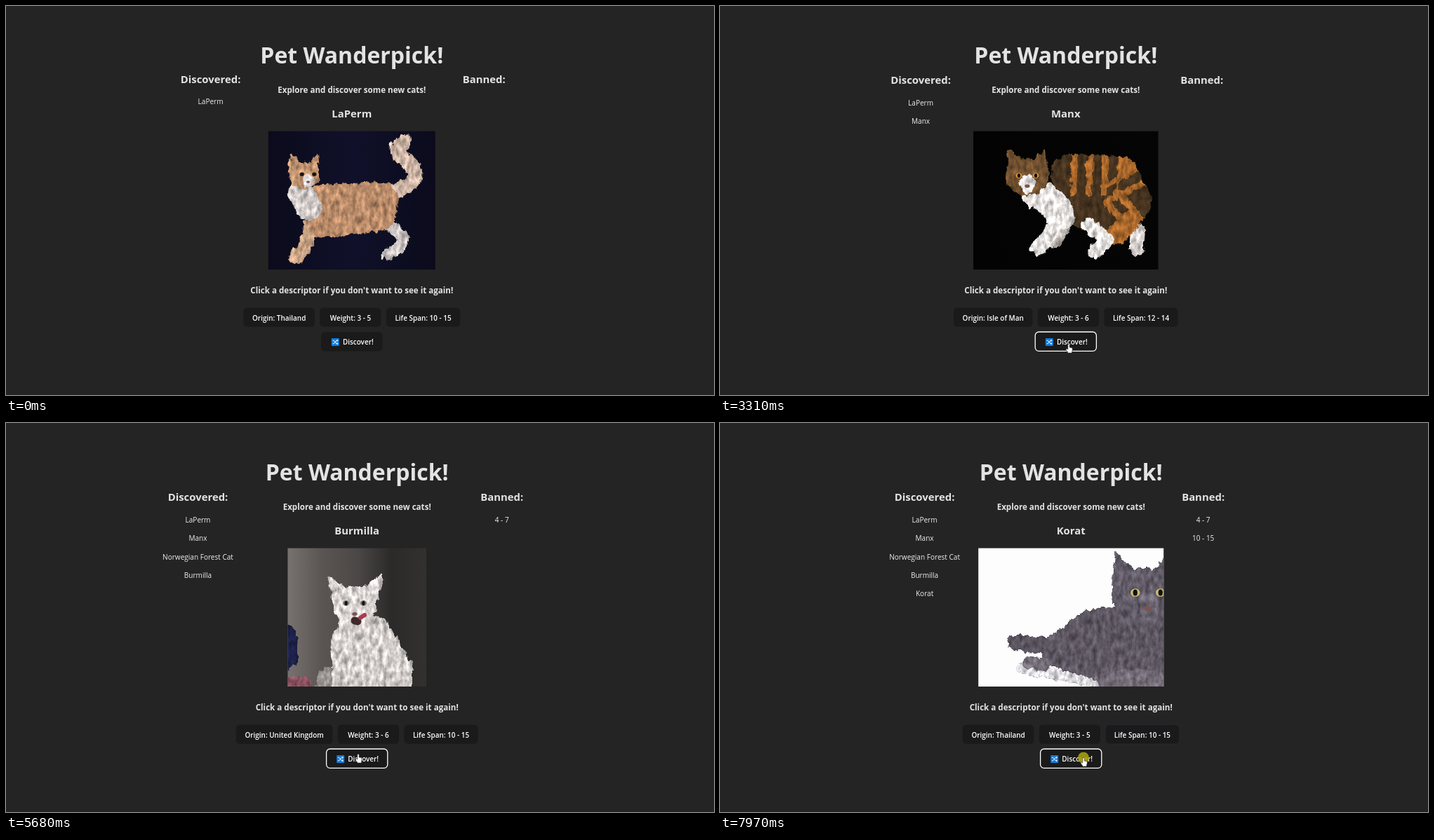
Animation of 1009 by 555 pixels, one loop 8000 ms. Source, as an HTML page:

```html
<!DOCTYPE html>
<html lang="en">
<head>
<meta charset="utf-8">
<title>Pet Wanderpick</title>
<style>
  html, body { margin: 0; width: 100%; height: 100%; overflow: hidden; background: #242424; }
  svg { display: block; width: 100%; height: 100%; }
  text { font: 400 10.05px "Open Sans", "Noto Sans", sans-serif; fill: #efefef; text-anchor: middle; }
  .h1, .h2, .h3 { font-weight: 700; fill: #e3e3e3; }
  .h1 { font-size: 32px; }
  .h2 { font-size: 14.9px; }
  .h3 { font-size: 11.62px; }
  .btn { font-weight: 600; font-size: 9.95px; fill: #fff; }
</style>
</head>
<body>
<svg viewBox="0 0 1009 555" preserveAspectRatio="none">
  <defs>
    <filter id="fur" filterUnits="userSpaceOnUse" x="350" y="165" width="300" height="225" color-interpolation-filters="sRGB">
      <feTurbulence type="fractalNoise" baseFrequency="0.16 0.09" numOctaves="3" seed="4" result="noise"/>
      <feDisplacementMap in="SourceGraphic" in2="noise" scale="9" xChannelSelector="R" yChannelSelector="G" result="ragged"/>
      <feColorMatrix in="noise" values="1 0 0 0 0  1 0 0 0 0  1 0 0 0 0  0 0 0 0 1" result="shade"/>
      <feComposite in="ragged" in2="shade" operator="arithmetic" k1="0.9" k2="0.55"/>
      <feGaussianBlur stdDeviation="0.6"/>
    </filter>
  </defs>
  <g id="photos"></g>
  <g id="page"></g>
  <g id="pointer"></g>
</svg>
<script>
const LOOP = 8000, STEP = 70, CENTER = 480;
const $ = id => document.getElementById(id);

// Parts are [thickness, colour, path, dash]; paths that close are filled too.
const cats = [
  { at: 0, name: 'LaPerm', origin: 'Thailand', weight: '3 - 5', life: '10 - 15',
    width: 238, back: ['#0b0b1c', '#10102a', '#0b0b1c'],
    parts: [
      [22, '#cbb3a4', 'M553 264Q600 250 572 222Q548 206 567 195'],
      [17, '#cbc4c2', 'M545 312Q574 330 562 343L544 354'],
      [20, '#c7a284', 'M434 310Q434 338 413 359'],
      [46, '#b98b69', 'M450 278L535 274L532 298L452 307Z'],
      [36, '#cfc9c7', 'M420 268L432 288']],
    head: [425, 240, 22], look: .25, coat: '#c19470', muzzle: '#dcd7d5', eye: '#2c221c' },
  { at: 2830, name: 'Manx', origin: 'Isle of Man', weight: '3 - 6', life: '12 - 14',
    width: 263.5, back: ['#030303', '#050505'],
    parts: [
      [20, '#d5d0cd', 'M596 320L594 347'],
      [18, '#b9b3ae', 'M495 308L477 336'],
      [58, '#46331f', 'M500 240L568 243L586 280L560 303L520 288Z'],
      [58, '#a9672b', 'M500 240L568 243L586 280L560 303', '9 13'],
      [30, '#a9672b', 'M582 308L566 326'],
      [20, '#e6e2e0', 'M525 312L552 334L534 351'],
      [42, '#e6e2e0', 'M450 268Q472 272 484 298'],
      [22, '#e6e2e0', 'M480 300Q476 325 453 345']],
    head: [438, 242, 30], coat: '#70502f', muzzle: '#eeeae8', eye: '#d88d32' },
  { at: 3440, name: 'Norwegian Forest Cat', origin: 'Norway', weight: '4 - 7', life: '12 - 16',
    width: 232.5, back: ['#252820', '#2b2e26', '#231615', '#4a1917', '#3d1614', '#2f1412'],
    parts: [
      [50, '#6b4225', 'M400 370L480 300L520 280L560 330L480 365Z'],
      [44, '#3a2216', 'M400 370L480 300L520 280', '14 22'],
      [46, '#ddd4cc', 'M517 278L572 272L560 302L530 322Z'],
      [24, '#cdd8e7', 'M440 378L530 358L605 310L640 312V390Z']],
    head: [541, 235, 27], look: -.4, coat: '#452818', muzzle: '#e4ddd7', eye: '#c99a42' },
  { at: 5610, name: 'Burmilla', origin: 'United Kingdom', weight: '3 - 6', life: '10 - 15',
    width: 197.5, back: ['#77726e', '#5a5552', '#4c4847', '#2b2929', '#333030'],
    parts: [
      [34, '#1d2148', 'M398 305V335'],
      [22, '#8b5361', 'M405 372H425'],
      [38, '#918b88', 'M460 368V390'],
      [46, '#d2cdca', 'M486 310L525 298L556 350V390H488Z'],
      [50, '#d2cdca', 'M498 275V320']],
    head: [497, 257, 31], ear: 1.25, coat: '#dbd6d4', muzzle: '#dbd6d4', eye: '#7b8078',
    mouth: [[11, '#40292b', 'M497 282l4 1'], [6, '#a83c50', 'M505 278l6 -4']] },
  { at: 6600, name: 'Korat', origin: 'Thailand', weight: '3 - 5', life: '10 - 15',
    width: 264, back: ['#fdfdfd', '#fdfdfd'],
    parts: [
      [14, '#dedce1', 'M430 350L560 374'],
      [22, '#5b5560', 'M421 313L470 318'],
      [44, '#5d5762', 'M480 325L530 288L600 280L650 300V380L570 355L500 333Z'],
      [18, '#77717c', 'M440 342L462 345'],
      [24, '#746d78', 'M548 368L600 362L640 372']],
    head: [603, 242, 45], look: .15, coat: '#615b67', muzzle: '#6a6470', eye: '#c9bd6c' }
];

// Pointer moves: start, end, x, y
const moves = [
  [190, 930, 769, 380], [1130, 1620, 520, 444], [1690, 1900, 495, 466],
  [1970, 2240, 497, 486], [2640, 2760, 497, 482], [3840, 4260, 500, 438],
  [4660, 5270, 502, 472], [6870, 7400, 600, 440], [7690, 7830, 518, 477]
];
const clicks = [2430, 3180, 4450, 5340, 6330, 7490, 7900];

function draw_part([size, color, d, dash]) {
  const cap = dash ? `stroke-dasharray="${dash}"` : 'stroke-linecap="round"';
  return `<path d="${d}" fill="${d.endsWith('Z') ? color : 'none'}" stroke="${color}" stroke-width="${size}" stroke-linejoin="round" ${cap}/>`;
}

const oval = (x, y, rx, ry, color) => `<ellipse cx="${x}" cy="${y}" rx="${rx}" ry="${ry}" fill="${color}"/>`;

function head({ head: [x, y, r], ear = .85, coat, muzzle, look = 0 }) {
  const ears = [-1, 1].map(k =>
    `<path d="M${x + k * ear * r} ${y - 1.25 * r}L${x + k * .25 * r} ${y - .6 * r}L${x + k * .95 * r} ${y}Z" fill="${coat}" stroke="${coat}" stroke-width="3" stroke-linejoin="round"/>`);
  return ears.join('') + oval(x, y + r * .08, r, r * .86, coat) + oval(x + look * r, y + r * .4, r * .36, r * .46, muzzle);
}

function face({ head: [x, y, r], look = 0, eye }) {
  const fx = x + look * r;
  return [-1, 1].map(k => oval(fx + k * .4 * r, y, r * .15, r * .13, eye) + oval(fx + k * .4 * r, y, r * .07, r * .1, '#141011')).join('') +
    oval(fx, y + r * .5, r * .12, r * .08, '#7a5550');
}

function photo(cat, i) {
  const x = layouts[i].cx - cat.width / 2;
  const stops = cat.back.map((c, k, all) => `<stop offset="${k / (all.length - 1)}" stop-color="${c}"/>`).join('');
  const rect = `<rect x="${x}" y="178.6" width="${cat.width}" height="197.4"`;
  return `<g><linearGradient id="back${i}">${stops}</linearGradient><clipPath id="box${i}">${rect}/></clipPath>
    ${rect} fill="url(#back${i})"/><g clip-path="url(#box${i})">
    <g filter="url(#fur)">${cat.parts.map(draw_part).join('')}${head(cat)}</g>
    ${face(cat)}${(cat.mouth || []).map(draw_part).join('')}</g></g>`;
}

const pen = document.createElement('canvas').getContext('2d');
function measure(s, font) {
  pen.font = font + ' "Open Sans", "Noto Sans", sans-serif';
  return pen.measureText(s).width;
}

// Three columns, centred together: discovered, buttons, banned
function layout(cat, index) {
  const names = cats.slice(0, index + 1).map(c => measure(c.name, '400 10.05px'));
  const leftW = Math.max(86, ...names), rightW = 60.4, gap = 6.6, space = 3.5;
  const widths = { origin: measure('Origin: ' + cat.origin, '600 9.95px') + 26, weight: 88, life: 106 };
  const rowW = widths.origin + widths.weight + widths.life + 2 * gap;
  const edge = CENTER - (leftW + rowW + rightW) / 2 - space;
  const texts = { origin: 'Origin: ' + cat.origin, weight: 'Weight: ' + cat.weight, life: 'Life Span: ' + cat.life };
  const rowX = edge + leftW + space, cx = rowX + rowW / 2, buttons = {};
  let x = rowX;
  for (const key in widths) {
    buttons[key] = { x, y: 430, w: widths[key], s: texts[key], shift: 0 };
    x += widths[key] + gap;
  }
  buttons.discover = { x: cx - 44, y: 464.6, w: 88, s: 'Discover!', shift: 9 };
  return { cx, buttons, left: edge + leftW / 2, right: rowX + rowW + space + rightW / 2 };
}
const layouts = cats.map(layout);

const catAt = t => Math.max(0, cats.filter(c => t >= c.at).length - 1);

function position(t) {
  let x = 950, y = 562;
  for (const [a, b, tx, ty] of moves) {
    if (t < a) break;
    const n = Math.round((b - a) / STEP) + 1;
    const u = Math.min(1, (Math.floor((t - a) / (b - a) * (n - 1) + 1e-6) + 1) / n), e = u * u * (3 - 2 * u);
    x += (tx - x) * e;
    y += (ty - y) * e;
  }
  return [x, y];
}

function hit(t) {
  const [x, y] = position(t), all = layouts[catAt(t)].buttons;
  return Object.keys(all).find(k => {
    const b = all[k];
    return x >= b.x && x <= b.x + b.w && y >= b.y && y <= b.y + 28;
  });
}

// Border fade of 250 ms, followed through the recent past
function glow(t) {
  const level = { origin: 0, weight: 0, life: 0, discover: 0 };
  for (let s = t - 500; s <= t; s += 10) {
    const over = hit(s);
    for (const k in level) level[k] = Math.min(1, Math.max(0, level[k] + (k === over ? .04 : -.04)));
  }
  return level;
}

const actions = clicks.map(at => ({ at, target: hit(at), cat: cats[catAt(at)] }));
const bans = actions.filter(a => a.target !== 'discover').map(a => ({ at: a.at + 2 * STEP, s: a.cat[a.target] }));

const label = (x, y, s, cls = '') => `<text x="${x}" y="${y}" class="${cls}">${s}</text>`;
const frame = (b, style) => `<rect x="${b.x + .4}" y="${b.y + .4}" width="${b.w - .8}" height="27.4" rx="5.2" ${style}/>`;

function icon(x, y) {
  return `<rect x="${x}" y="${y}" width="11" height="11" rx=".8" fill="#0f7bdc"/>
    <path transform="translate(${x} ${y})" d="M1.8 3.3H3.5L7 7.7H9M1.8 7.7H3.5L7 3.3H9M7.8 1.9L9.2 3.3L7.8 4.7M7.8 6.3L9.2 7.7L7.8 9.1" fill="none" stroke="#fff"/>`;
}

function page(t, index) {
  const { cx, left, right, buttons } = layouts[index], drop = index ? 1 : 0, shine = glow(t);
  const last = actions.filter(a => t >= a.at + STEP).pop();
  const row = i => 140.3 + drop * 1.4 + i * 26.4;
  let s = label(cx, 82.4, 'Pet Wanderpick!', 'h1') +
    label(cx, 123.8, 'Explore and discover some new cats!', 'h3') +
    label(cx, 159.3, cats[index].name, 'h2') +
    label(cx, 409.8, "Click a descriptor if you don't want to see it again!", 'h3') +
    label(left, 109.5 + drop, 'Discovered:', 'h2') + label(right, 109.5 + drop, 'Banned:', 'h2');
  cats.slice(0, index + 1).forEach((c, i) => s += label(left, row(i), c.name));
  bans.filter(b => t >= b.at).forEach((b, i) => s += label(right, row(i), b.s));
  for (const key in buttons) {
    const b = buttons[key];
    s += frame(b, 'fill="#1a1a1a"') + label(b.x + b.w / 2 + b.shift, b.y + 18.5, b.s, 'btn');
    if (last && last.target === key) s += frame(b, 'fill="none" stroke="#fff" stroke-width="1.3"');
    else if (shine[key] > 0) s += frame(b, `fill="none" stroke="#646cff" stroke-width=".8" stroke-opacity="${shine[key].toFixed(2)}"`);
  }
  return s + icon(cx - 29, 474);
}

const ARROW = 'M0 0V10L2.3 7.9L3.8 11.4L5.3 10.7L3.8 7.3H6.9Z';
const HAND = 'M-1.2 1Q0-.6 1.2 1V5L4 5.6Q5.6 6 5.4 8L4.6 11.3V13H-1.5V11.8L-4 8.2Q-4 6.6-2.6 7L-1.2 8Z';

function pointer(t) {
  const [x, y] = position(t), pressed = clicks.some(c => t >= c && t < c + 130);
  const spot = pressed ? `<circle cx="${x}" cy="${y + .5}" r="8" fill="#aaa308" fill-opacity=".88"/>` : '';
  return spot + `<path transform="translate(${x} ${y})" d="${hit(t) ? HAND : ARROW}" fill="#fff" stroke="#222" stroke-width=".6"/>`;
}

$('photos').innerHTML = cats.map(photo).join('');
const pictures = [...$('photos').children];
const drawn = {};

function put(id, html) {
  if (drawn[id] !== html) $(id).innerHTML = drawn[id] = html;
}

// The picture loads one step after its text.
function draw(t) {
  const index = catAt(t), shown = catAt(t - STEP);
  pictures.forEach((g, i) => g.style.display = i === shown ? '' : 'none');
  pictures[shown].setAttribute('transform', `translate(${layouts[index].cx - layouts[shown].cx} 0)`);
  put('page', page(t, index));
  put('pointer', pointer(t));
}

const start = performance.now();
function tick() {
  draw((performance.now() - start) % LOOP);
  requestAnimationFrame(tick);
}
tick();
</script>
</body>
</html>
```
